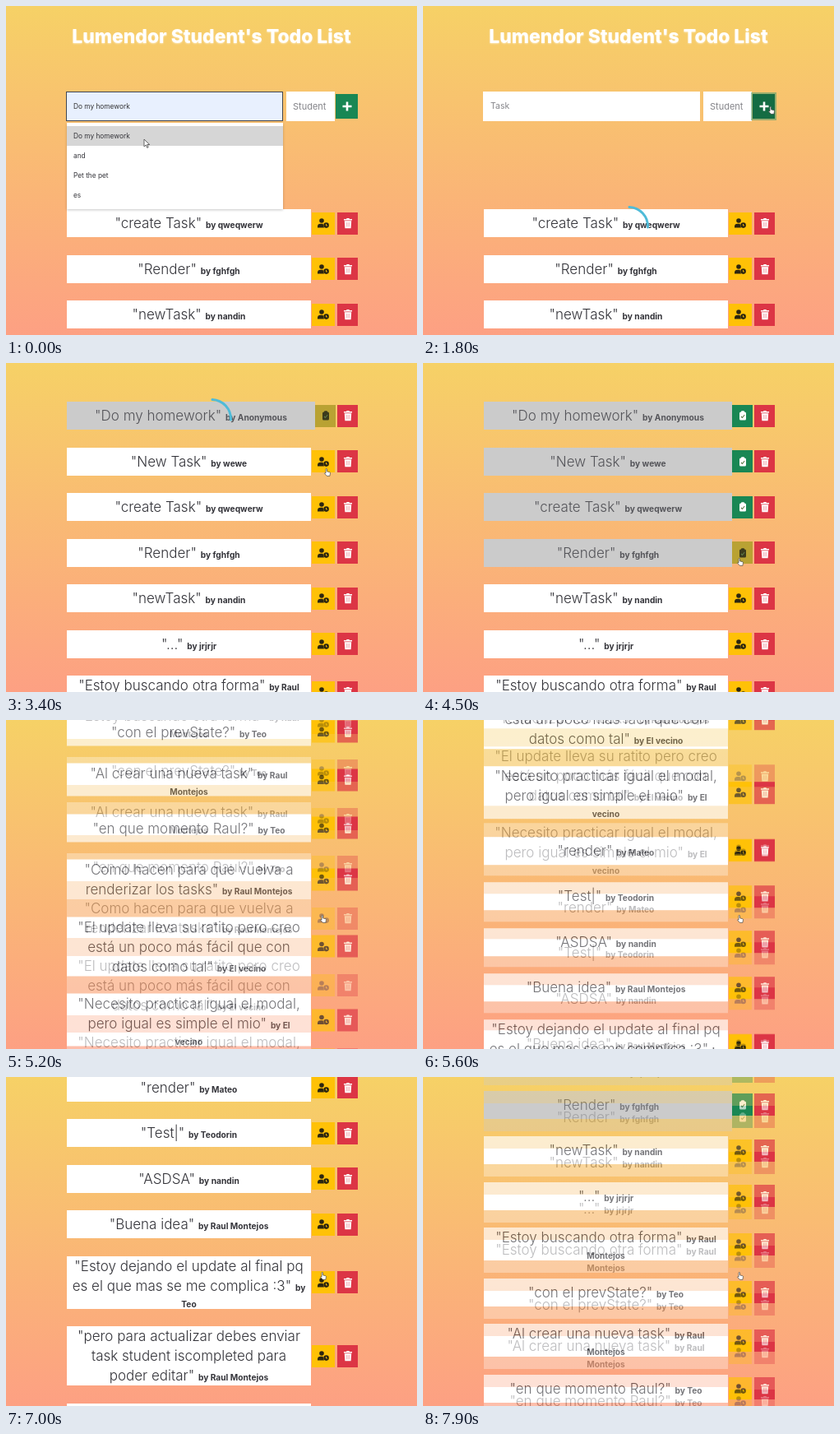
These frames come from a looping animation (500 by 400 pixels, 8 s). An HTML page:

```html
<!DOCTYPE html>
<html lang="es">
<head>
<meta charset="utf-8">
<title>Todo List</title>
<style>
html, body { margin: 0; width: 100%; height: 100%; overflow: hidden; }
body { position: relative; font-family: Inter, "Open Sans", sans-serif; color: #34343a; }
.scene { position: absolute; left: 0; top: 0; width: 500px; height: 400px; overflow: hidden;
  background: linear-gradient(#f6d166, #fda083); }
.page { position: absolute; left: 0; top: 0; width: 500px; }
.page > * { position: absolute; box-sizing: border-box; }
h1 { left: 0; top: 22px; width: 500px; margin: 0; text-align: center; font-size: 22.9px; line-height: 30px;
  font-weight: 800; color: #fff; white-space: nowrap; text-shadow: 0 1px 2px rgba(255,255,255,.5); }
.field { top: 104px; height: 36px; padding-left: 8px; background: #fff; border: 1px solid #fff;
  line-height: 34px; font-size: 10.5px; color: #85858a; white-space: nowrap; }
.task { left: 73px; width: 264px; }
.task.filled { background: #e8f0fe; color: #333; font-size: 8.3px; }
.task.focus { border-color: #3f4652; }
.student { left: 341px; width: 59px; font-size: 11px; padding-left: 7px; }
.add { left: 401px; top: 107px; width: 27px; height: 30px; background: #198754; }
.add.hover { background: #146c43; box-shadow: 0 0 0 2px rgba(60,153,110,.5); }
.add svg { left: 6.5px; top: 8px; }
.menu { left: 74px; top: 142px; width: 263px; height: 105px; padding-top: 4px; background: #fff;
  box-shadow: 0 1px 3px rgba(0,0,0,.22); font-size: 8.3px; }
.menu div { height: 24px; line-height: 24px; padding-left: 8px; }
.menu div:first-child { background: #d6d6d6; }
.row { left: 74px; width: 354px; }
.row > * { position: absolute; }
.card { left: 0; top: 0; width: 297px; height: 100%; background: #fff; display: flex; flex-direction: column;
  justify-content: center; text-align: center; white-space: nowrap; }
.big { height: 24px; line-height: 24px; font-size: 17px; font-weight: 300; }
.small { height: 16px; line-height: 16px; }
b { font-size: 10.2px; font-weight: 700; }
.btn { top: calc(50% - 13.5px); height: 27px; }
.state { left: 298px; width: 28px; background: #ffc107; color: #2c2610; }
.trash { left: 329px; width: 25px; background: #dc3545; color: #fff; }
svg { position: absolute; overflow: visible; }
.btn svg { left: calc(50% - 7px); top: 6.5px; }
.check { display: none; }
.done .card { width: 302px; background: #cbcbcb; color: #55555a; }
.done .state { left: 302px; width: 25px; background: #198754; color: #fff; }
.done.mid .state { background: #b9a233; color: #3a3a1c; }
.done .user { display: none; }
.done .check { display: block; }
.spin { left: 225px; top: 243px; width: 50px; height: 50px; }
#cursor { position: absolute; left: 0; top: 0; }
</style>
</head>
<body>
<script>
// Each task: lines split by "/", author part after "~"
const TASKS = [
  '"Do my homework"~by Anonymous',
  '"New Task"~by wewe',
  '"create Task"~by qweqwerw',
  '"Render"~by fghfgh',
  '"newTask"~by nandin',
  '"..."~by jrjrjr',
  '"Estoy buscando otra forma"~by Raul/~Montejos',
  '"con el prevState?"~by Teo',
  '"Al crear una nueva task"~by Raul/~Montejos',
  '"en que momento Raul?"~by Teo',
  '"Como hacen para que vuelva a/renderizar los tasks"~by Raul Montejos',
  '"El update lleva su ratito pero creo/está un poco más fácil que con/datos como tal"~by El vecino',
  '"Necesito practicar igual el modal,/pero igual es simple el mio"~by El/~vecino',
  '"render"~by Mateo',
  '"Test|"~by Teodorin',
  '"ASDSA"~by nandin',
  '"Buena idea"~by Raul Montejos',
  '"Estoy dejando el update al final pq/es el que mas se me complica :3"~by/~Teo',
  '"pero para actualizar debes enviar/task student iscompleted para/poder editar"~by Raul Montejos',
  '"rayos "~by Teo',
  '"No, mis task las borraron"~by Raul/~Montejos'
];

const LOOP = 8000, STEP = 100, ADDED = 2000, NEW_ROWS = 2;
const LIST_TOP = 247, GAP = 21.5, MIN_H = 34;
const DONE_AT = [3300, 3800, 4100, 4400];
const LOADING = [[1600, 2000], [3200, 3600], [3700, 3900], [4000, 4200], [4300, 4500]];
const SCROLL = [[2200, 0], [2800, 200], [4600, 200], [5100, 597], [5200, 644.5], [5900, 1128],
  [6100, 1138], [6300, 1138], [6700, 1067], [7100, 1067], [7800, 412], [7900, 397]];
const POINTER = [[400, 168, 162], [1300, 421, 122], [2300, 421, 122], [3000, 388, 57], [3300, 388, 57],
  [3400, 388, 128], [3800, 388, 128], [4000, 386, 183], [4100, 386, 183], [4300, 383, 237]];

const ICONS = {
  user: '<svg class="user" width="14" height="14" fill="currentColor"><circle cx="5" cy="4" r="2.8"/>' +
    '<path d="M0 12.5V11a3.5 3.5 0 0 1 3.5-3.3h3L8 12.5z"/><circle cx="10.6" cy="9.6" r="3.3"/>' +
    '<path d="M10.5 8v2h1.4" fill="none" stroke="#ffc107" stroke-width=".9"/></svg>',
  check: '<svg class="check" width="14" height="14"><rect x="3" y="2.5" width="8" height="10" rx="1.5" fill="currentColor"/>' +
    '<rect x="5" y="1.2" width="4" height="2.5" rx="1" fill="currentColor"/>' +
    '<path d="M5 8l1.5 1.5L9.2 6" fill="none" stroke="#5d7a48" stroke-width="1.1"/></svg>',
  trash: '<svg width="14" height="14" fill="currentColor"><path d="M2 2h3l.6-1h2.8L9 2h3v1.5H2zM2.8 4.3h8.4l-.6 9H3.4z"/>' +
    '<path d="M5.3 6v5.5M7 6v5.5M8.7 6v5.5" stroke="#dc3545" stroke-width=".6" opacity=".6"/></svg>',
  plus: '<svg width="14" height="14" stroke="#fff" stroke-width="2.6"><path d="M7 1.5v11M1.5 7h11"/></svg>',
  arc: '<svg width="50" height="50" fill="none" stroke="#4fbbd8" stroke-width="3" stroke-linecap="round">' +
    '<path d="M26 1.5A23.5 23.5 0 0 1 48.5 26"/></svg>'
};

function add(parent, cls, html = '', tag = 'div') {
  const el = document.createElement(tag);
  el.className = cls;
  el.innerHTML = html;
  return parent.appendChild(el);
}

function lineHtml(line) {
  const [big, by] = line.split('~');
  const author = by ? `<b>${by}</b>` : '';
  return big ? `<div class="big">${big} ${author}</div>` : `<div class="small">${author}</div>`;
}

function makeScene() {
  const scene = add(document.body, 'scene');
  const page = add(scene, 'page');
  add(page, '', "Lumendor Student's Todo List", 'h1');
  const task = add(page, 'field task');
  add(page, 'field student', 'Student');
  const plus = add(page, 'add', ICONS.plus);

  let top = LIST_TOP;
  const rows = TASKS.map(text => {
    const lines = text.split('/');
    const sum = lines.reduce((h, l) => h + (l[0] === '~' ? 16 : 24), 0);
    const height = Math.max(MIN_H, sum);
    const el = add(page, 'row',
      `<div class="card">${lines.map(lineHtml).join('')}</div>` +
      `<div class="btn state">${ICONS.user}${ICONS.check}</div>` +
      `<div class="btn trash">${ICONS.trash}</div>`);
    el.style.height = height + 'px';
    const row = { el, top };
    top += height + GAP;
    return row;
  });
  const spin = add(page, 'spin', ICONS.arc);
  const menu = add(page, 'menu', ['Do my homework', 'and', 'Pet the pet', 'es'].map(s => `<div>${s}</div>`).join(''));

  function draw(t, scroll) {
    page.style.transform = `translateY(${-scroll}px)`;
    const filled = t < 1600;
    task.textContent = filled ? 'Do my homework' : 'Task';
    task.className = 'field task' + (filled ? ' filled' : '') + (t < 1400 ? ' focus' : '');
    plus.classList.toggle('hover', t >= 1300 && t < 2400);
    menu.style.display = t < 400 ? '' : 'none';
    const shift = t < ADDED ? rows[NEW_ROWS].top - LIST_TOP : 0;
    rows.forEach(({ el, top }, i) => {
      el.style.top = top - shift + 'px';
      el.style.display = shift && i < NEW_ROWS ? 'none' : '';
      const age = t - DONE_AT[i];
      el.classList.toggle('done', age >= 0);
      el.classList.toggle('mid', age >= 0 && age < 200);
    });
    spin.style.display = LOADING.some(([a, b]) => t >= a && t < b) ? '' : 'none';
    spin.style.transform = `rotate(${(t - 1800) / 800 * 360}deg)`;
  }
  return { el: scene, draw };
}

// Linear track through [time, ...values] keys
function track(keys, t) {
  const n = keys.findIndex(k => k[0] > t);
  if (n === 0) return keys[0].slice(1);
  if (n < 0) return keys[keys.length - 1].slice(1);
  const a = keys[n - 1], b = keys[n], p = (t - a[0]) / (b[0] - a[0]);
  return a.slice(1).map((v, i) => v + (b[i + 1] - v) * p);
}

const main = makeScene();
const trail = makeScene();
trail.el.style.opacity = .32;

const cursor = add(document.body, '',
  '<svg width="12" height="14" fill="#fff" stroke="#444" stroke-width=".8" stroke-linejoin="round">' +
  '<path class="arrow" d="M0 0v9l2.2-2 1.5 3.4 1.5-.7-1.5-3.2h3z"/>' +
  '<path class="hand" transform="scale(.85)" d="M1.2 1q1-1.2 1.8 0v3.6l3.8.9q1 .4.8 1.5L7 11H2.8L-.6 7.3q.2-1.2 1.8-.2z"/></svg>');
cursor.id = 'cursor';
const arrow = cursor.querySelector('.arrow');
const hand = cursor.querySelector('.hand');

function render(t) {
  const [scroll] = track(SCROLL, t);
  const [before] = track(SCROLL, t - STEP);
  const speed = Math.abs(scroll - before);
  main.draw(t, scroll);
  trail.el.style.display = speed > 0 ? '' : 'none';
  if (speed > 0) trail.draw(t, scroll - speed);

  const [x, y] = track(POINTER, t);
  const pointing = (t >= 1200 && t < 2400) || t >= 2900;
  cursor.style.transform = `translate(${x}px, ${y}px)`;
  arrow.style.display = pointing ? 'none' : '';
  hand.style.display = pointing ? '' : 'none';
}

const start = performance.now();
let shown = -1;
function tick() {
  const time = Math.max(0, performance.now() - start) % LOOP;
  const t = Math.floor(time / STEP) * STEP;
  if (t !== shown) render(shown = t);
  requestAnimationFrame(tick);
}
tick();
</script>
</body>
</html>
```
